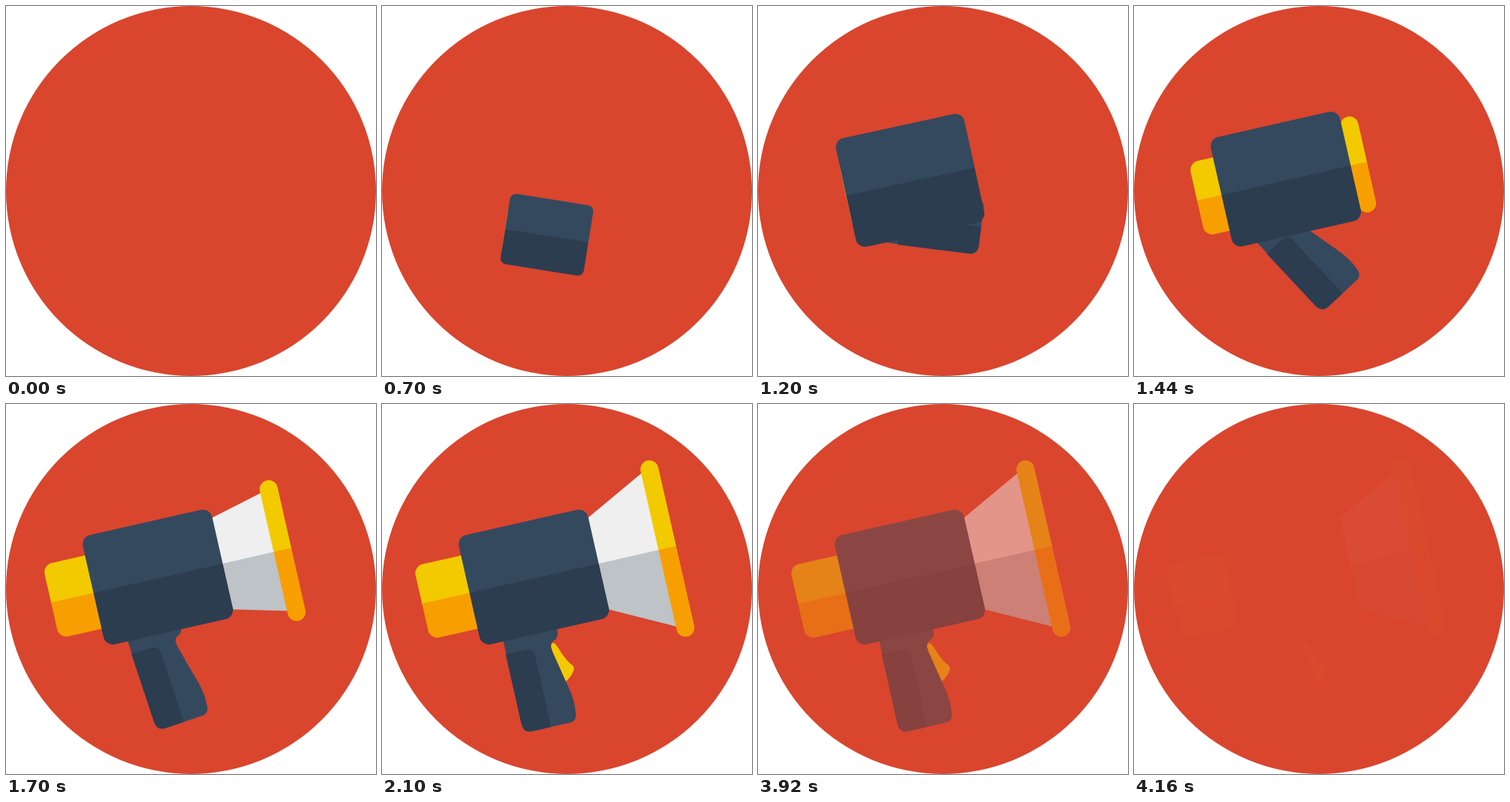
Animation, 512 px wide and 512 px high, one loop 4820 ms. Source, as an HTML page:

```html
<!DOCTYPE html>
<html lang="en">
<head>
<meta charset="utf-8">
<title>Megaphone</title>
<style>
  html, body { margin: 0; width: 100%; height: 100%; overflow: hidden; background: #fff; }
  svg { display: block; width: 100vw; height: 100vh; }
  .navy { fill: #34495e; }
  .dark { fill: #2c3d50; }
  .gold { fill: #f3c900; }
  .amber { fill: #f89f00; }
  .white { fill: #efefef; }
  .grey { fill: #bdc3c7; }
</style>
</head>
<body>
<svg viewBox="0 0 512 512">
  <circle cx="256" cy="256" r="256" fill="#da452e"/>
  <g id="horn">
    <g id="grip">
      <path id="trigger" class="gold" d="M234 336Q234 330 238 331C241 332 244 338 250 347C256 355 258 357 263 361Q267 364 265 369Q262 378 254 384L236 343Z"/>
      <g id="handle">
        <path class="navy" d="M165 315L193 443Q196 455 207 453L262 440.5Q270 437 268 427C267 412 261 397 254 383L236 343Q231 332 237 328Q243 325 243 318L242 305Z"/>
        <path class="dark" d="M171 346L200 340Q210 338.5 212 349L234 447L207 453Q196 455 193 443Z"/>
      </g>
    </g>
    <g transform="translate(210 239) rotate(-12.8)">
      <g id="back"></g>
      <path id="coneTop" class="white"/>
      <path id="coneLow" class="grey"/>
      <path id="rimTop" class="gold"/>
      <path id="rimLow" class="amber"/>
      <g id="body"></g>
    </g>
  </g>
</svg>
<script>
const LOOP = 4820, MID = 2.2;
const $ = id => document.getElementById(id);
const set = (id, name, value) => $(id).setAttribute(name, value);
const clamp = v => Math.min(1, Math.max(0, v));

// Share of the way still to go, easing out
const left = (t, start, length) => (1 - clamp((t - start) / length)) ** 2;

const easeInOut = p => p < 0.5 ? 4 * p ** 3 : 1 - 4 * (1 - p) ** 3;

// Half of a rounded box, flat at y0 and rounded at y1
function half(x, w, y0, y1, r) {
  const down = y1 > y0, y = down ? y1 - r : y1 + r, arc = `A${r} ${r} 0 0 ${down ? 0 : 1} `;
  return `M${x} ${y0}V${y}${arc}${x + r} ${y1}H${x + w - r}${arc}${x + w} ${y}V${y0}Z`;
}

const box = (x, w, top, low, r, c1, c2) =>
  `<path class="${c1}" d="${half(x, w, MID + 0.6, top, r)}"/>` +
  `<path class="${c2}" d="${half(x, w, MID, low, r)}"/>`;

$('back').innerHTML = box(-159, 81, -51, 53, 13, 'gold', 'amber');
$('body').innerHTML = box(-91.7, 183.4, -77, 78, 13, 'navy', 'dark');

function drawFront(t) {
  const x = 176.5 - 190 * left(t, 1240, 620);
  const h = 112.3 - 57 * left(t, 1500, 600);
  const wide = h - 3.3, slim = Math.min(65, wide), edge = Math.min(91.2, x);
  const cone = (y, s) => `M${edge} ${y}V${MID + s * slim}L${x + 1} ${MID + s * wide}V${y}Z`;
  set('coneTop', 'd', cone(MID + 0.6, -1));
  set('coneLow', 'd', cone(MID, 1));
  set('rimTop', 'd', half(x, 25, MID + 0.6, 3 - h - 12.5, 12.5));
  set('rimLow', 'd', half(x, 25, MID, 3 + h + 12.5, 12.5));
}

function draw(t) {
  const e = left(t, 600, 690);
  set('horn', 'transform',
    `translate(${210 + 25 * e} ${239 + 106 * e}) rotate(${30 * e}) scale(${1 - e / 2}) translate(-210 -239)`);

  // A faint trace of the pale parts stays until the loop restarts
  const fade = 1 - easeInOut(clamp((Math.min(t, 4100) - 3600) / 630));
  set('horn', 'opacity', t < 600 ? 0 : clamp((t - 580) / 100) * fade);
  const shown = t < 4160 ? 'visible' : 'hidden';
  set('body', 'visibility', shown);
  set('handle', 'visibility', shown);

  set('back', 'transform', `translate(${67 * left(t, 1230, 700)} 0)`);
  set('grip', 'transform', `rotate(${-90 * left(t, 1110, 790)} 170.5 321.6)`);
  set('trigger', 'transform', `translate(${-24 * left(t, 1660, 420)} 0)`);
  drawFront(t);
}

const begin = performance.now();
function tick() {
  draw((performance.now() - begin) % LOOP);
  requestAnimationFrame(tick);
}
tick();
</script>
</body>
</html>
```
